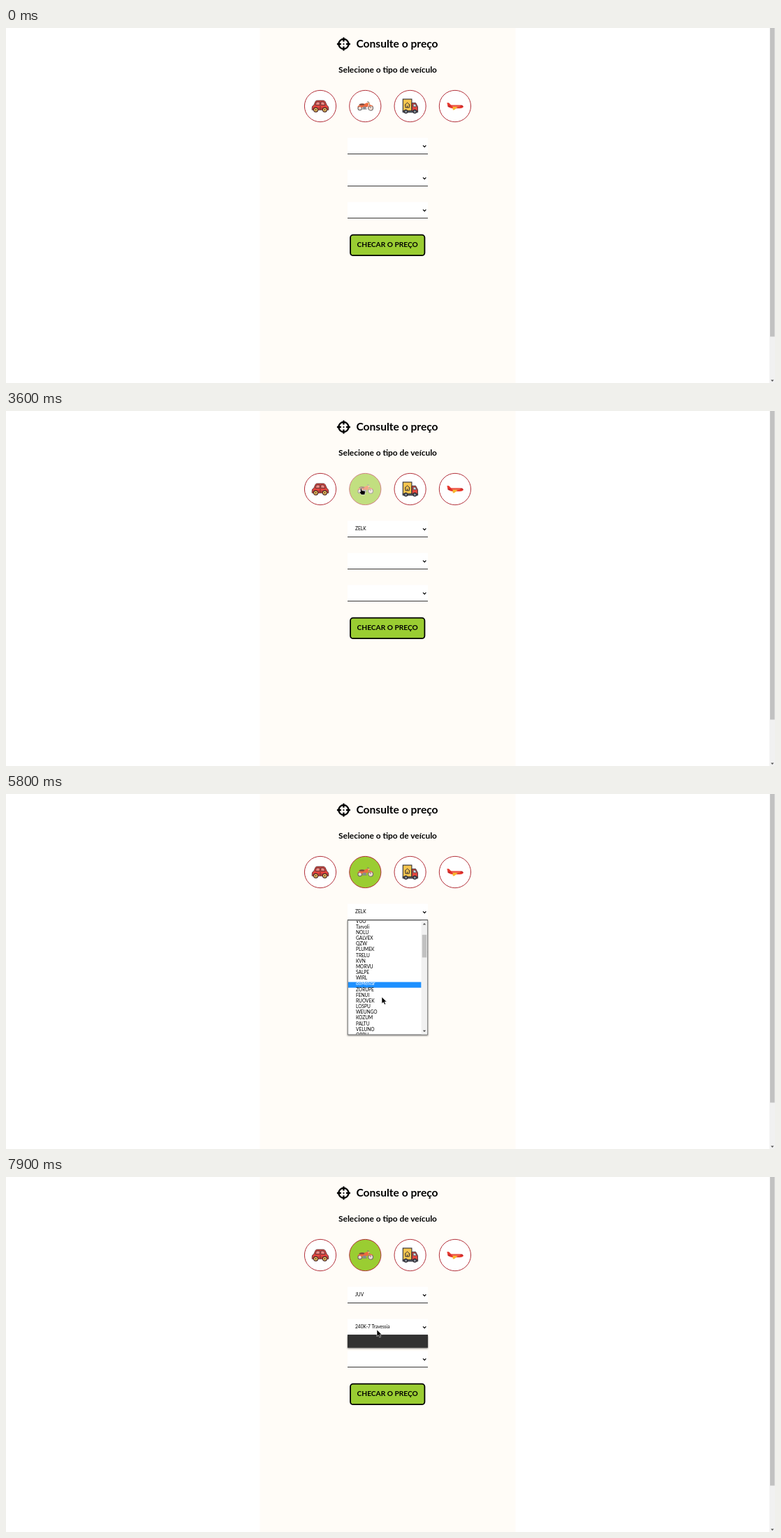
An HTML page for the animation above (8 s loop, 1101 px wide and 509 px high).

```html
<!DOCTYPE html>
<html lang="pt">
<head>
<meta charset="utf-8">
<style>
  html, body { margin: 0; width: 100%; height: 100%; overflow: hidden; background: #fff; }
  svg { display: block; width: 1101px; height: 509px; font-family: Lato, "Open Sans", sans-serif; }
  .title { font-weight: 700; text-anchor: middle; }
  .small { font-size: 6.6px; }
  .ring { stroke: #b3303a; }
</style>
</head>
<body>
<svg viewBox="0 0 1101 509">
  <defs>
    <filter id="shadow" x="-10%" y="-20%" width="120%" height="150%">
      <feDropShadow dx="0" dy="1" stdDeviation="1.3" flood-opacity=".55"/>
    </filter>
    <clipPath id="listClip"><rect x="490" y="181.5" width="113" height="163"/></clipPath>

    <g id="car" stroke="#4a2a2c" stroke-width=".8">
      <path d="M-9.5-1 L-7-6.5 Q-6.5-8-4.5-8 H4.5 Q6-8 7-6.5 L9.5-1 Q11.8 0 11.8 3 V5.5 H-11.8 V2 Q-11.8-.5-9.5-1Z" fill="#e2443e"/>
      <path d="M-7-1.5 L-5.4-6 H-.8 V-1.5Z M.8-1.5 V-6 H5 L7-1.5Z" fill="#f08a85"/>
      <path d="M-11.5 3.2 H11.5 M0-1 V5" fill="none" stroke-width=".6"/>
      <g fill="#f4c95d" stroke-width="1.2"><circle cx="-6.4" cy="5.3" r="3.1"/><circle cx="6.4" cy="5.3" r="3.1"/></g>
      <g fill="#4a2a2c" stroke="none"><circle cx="-6.4" cy="5.3" r="1"/><circle cx="6.4" cy="5.3" r="1"/></g>
    </g>

    <g id="bike">
      <g fill="#f3dfd5" stroke="#6a6668" stroke-width="1.1"><circle cx="-7.6" cy="3" r="2.8"/><circle cx="7.8" cy="2.8" r="3.4"/></g>
      <path d="M3-6.5 L5-5.5 L8 2.8 M-5 4 H2.5" fill="none" stroke="#77777b" stroke-width="1.1"/>
      <path d="M-11.5 1.8 Q-10-2-6.5-1.5 L-4.5-3.2 H-.8 Q2.5-6 5-3.8 L4 .5 L1 2 H-5.5 Q-8-1-11.5 1.8Z" fill="#ed6a40"/>
      <path d="M-9-2.5 Q-5-4.5-.8-3 L-2-1.2 H-8Z" fill="#7b4a3e"/>
      <path d="M-3.5.8 H1.6 L.6 4.6 H-3Z" fill="#8a8a90"/>
      <path d="M5-1 Q9-3.2 11.5 1 Q8-.8 5 1Z" fill="#f2754c"/>
      <circle cx="5.2" cy="-4" r="1.3" fill="#f2b06b"/>
    </g>

    <g id="truck" stroke="#2b2b33">
      <path d="M-10.5 6.5 H11 V9 H-10.5Z" fill="#5c6470" stroke-width=".8"/>
      <rect x="-10.3" y="-10" width="12.6" height="16.8" fill="#f7c64f" stroke-width="1.1"/>
      <path d="M-7.8-1.4 L-4-5 L-.2-1.4 M-6.7-2 V2 H-1.3 V-2 M-4 2 V-.6" fill="none"/>
      <path d="M2.6-4.6 H8 L10.8.8 V7 H2.6Z" fill="#e5483f" stroke-width=".9"/>
      <path d="M4.6-2.8 H7.4 L9.2.8 H4.6Z" fill="#c9e6f2" stroke-width=".6"/>
      <g fill="#8d949c" stroke-width="1.3"><circle cx="-6" cy="7.8" r="2.3"/><circle cx="6.7" cy="7.8" r="2.3"/></g>
    </g>

    <g id="plane">
      <path d="M-11.6-4.8 H-8.8 L-5.6-1.6 H6 Q11-1.8 12 .4 Q11.5 3 7 3.2 H-4 Q-9 2.6-10.5-.8Z" fill="#e8392f"/>
      <path d="M-11-.6 H-5.5 L-7.5 1.2 H-9.8Z M8.2-1.5 Q11-1.2 11.8.4 H8.4Z" fill="#b9222a"/>
      <path d="M-3.2 1 H4 L-1 5.4 H-3.2Z" fill="#f7b52e"/>
      <path d="M-3.6.2 H7" stroke="#ffd9a0" stroke-width=".8" stroke-dasharray="1 .8"/>
    </g>

    <path id="arrow" d="M0 0 V9.6 L2.3 7.6 L3.9 11 L5.6 10.2 L4.1 6.9 H7.1Z" fill="#000" stroke="#fff" stroke-width=".6"/>
    <path id="hand" d="M-.2 0 Q1.3-.5 1.6 1 L2 3.4 L5.8 4 Q7 4.3 6.8 5.6 L6.2 9.6 H1.2 L-1.4 6.2 Q-1.3 5 0 5.4Z" fill="#000" stroke="#fff" stroke-width=".6"/>
  </defs>

  <rect width="1101" height="509" fill="#fff"/>
  <rect x="363.5" width="366" height="509" fill="#fffcf7"/>
  <rect x="1093" width="8" height="509" fill="#f1f1f1"/>
  <rect x="1094" width="6.5" height="442.5" fill="#c1c1c1"/>
  <path d="M1095 504.5 h4.4 l-2.2 2.4z" fill="#505050"/>

  <g transform="translate(483.4 23)" fill="none" stroke="#000">
    <circle r="7.1" stroke-width="2.3"/>
    <path d="M0-9.5 V-3.6 M0 9.5 V3.6 M-9.5 0 H-3.6 M9.5 0 H3.6" stroke-width="2.4"/>
    <circle r="1.1" fill="#000" stroke="none"/>
  </g>
  <text class="title" x="560" y="28" font-size="15.6">Consulte o preço</text>
  <text class="title" x="546.5" y="63.6" font-size="11.9">Selecione o tipo de veículo</text>

  <g id="vehicles"></g>
  <g id="selects"></g>
  <g id="button">
    <rect x="493" y="296.6" width="106.4" height="29.6" rx="4" fill="#9acd32" stroke="#000" stroke-width="1.8"/>
    <text class="title" x="546.2" y="314.3" font-size="10.2">CHECAR O PREÇO</text>
  </g>
  <rect id="focus" x="488.6" y="157.6" width="115.6" height="23.6" rx="1" fill="none" stroke="#222"/>

  <g id="popup">
    <rect x="489.3" y="181" width="114.4" height="164" fill="#fff" stroke="#6d6d6d" stroke-width=".9" filter="url(#shadow)"/>
    <g clip-path="url(#listClip)">
      <rect id="bar" x="490" width="104.6" height="8.16" fill="#1e90ff"/>
      <g id="rows" class="small"></g>
      <rect x="594.6" y="181" width="8.6" height="164" fill="#f1f1f1"/>
      <rect id="thumb" x="595.8" width="6.4" height="32.6" fill="#c1c1c1"/>
      <path id="up" d="M596.8 187.4 h4.4 l-2.2-2.5z"/>
      <path d="M596.8 338.8 h4.4 l-2.2 2.5z" fill="#505050"/>
    </g>
  </g>
  <rect id="blank" x="489" width="115" fill="#333" filter="url(#shadow)"/>
  <use id="cursor"/>
</svg>

<script>
const LOOP = 8000, STEP = 100;
const ROW = 8.16, LIST_TOP = 181.7;
const brands = ("ZELK,OMBRIL,QUARNEVO,TILVORA,NUVEK,RONDEPA,KIPUL,VUO,Tarvoli,NOLU,GALVEX,QZW,PLUMEK," +
  "TRELU,KVN,MORVU,SALPE,WIRL,doMelvar,ZORUPE,FENUI,RUOVEK,LOSPU,WEUNGO,KOZUM,PALTU,VELUNO,OPPU,JUV," +
  "PRELO RODACALMAS,GWL,SOLVETA,TUMBERO").split(",");

// [time, x, y]
const path = [
  [100, 481, -5], [400, 479, 58], [600, 463, 112], [800, 467, 124], [900, 483, 125],
  [1000, 507, 125], [1200, 553, 123], [1300, 573.5, 122], [1500, 624, 125], [1700, 645, 121],
  [1800, 645, 121], [2400, 507.5, 110.5], [3600, 507.5, 110.5], [4400, 530, 164], [4600, 530, 164],
  [5000, 533.5, 250.5], [5400, 538, 291], [6200, 538, 291], [6500, 526, 307],
  [6900, 526, 320], [7200, 526, 320], [7600, 531, 219]
];
const scrollKeys = [[5400, 0], [5500, 6], [5600, 20], [5800, 59], [5900, 80], [6000, 91.5]];

const $ = id => document.getElementById(id);
const set = (el, attrs) => { for (const k in attrs) el.setAttribute(k, attrs[k]); };
const show = (el, on) => set(el, { visibility: on ? "visible" : "hidden" });

function sample(keys, t) {
  if (t <= keys[0][0]) return keys[0].slice(1);
  for (let i = 1; i < keys.length; i++) {
    const [a, ...from] = keys[i - 1], [b, ...to] = keys[i];
    if (t <= b) return from.map((v, k) => v + (to[k] - v) * (t - a) / (b - a));
  }
  return keys[keys.length - 1].slice(1);
}

const circleX = i => 450 + 64.3 * i;
$("vehicles").innerHTML = ["car", "bike", "truck", "plane"].map((name, i) =>
  `<g transform="translate(${circleX(i)} 112)"><circle class="ring" r="22.6" fill="#fff"/><use href="#${name}"/></g>`).join("");
$("selects").innerHTML = [0, 46, 92].map(dy =>
  `<g transform="translate(0 ${dy})"><rect x="489" y="157.5" width="115" height="23" fill="#fff"/>
   <path d="M489 180.6 H604" stroke="#333"/>
   <path d="M597 168.4 l2.2 2.2 l2.2-2.2" fill="none" stroke="#000" stroke-width="1.3"/>
   <text class="small" x="500" y="171"></text></g>`).join("");
$("rows").innerHTML = brands.map((name, i) =>
  `<text x="501" y="${LIST_TOP + i * ROW + 4.8}">${name}</text>`).join("");

const vehicles = [...$("vehicles").children];
const labels = [...$("selects").querySelectorAll("text")];
const rows = [...$("rows").children];

function drawList(t, y) {
  const [scroll] = sample(scrollKeys, t);
  // The highlight only follows the pointer while it moves.
  const hoverScroll = t < 6300 ? Math.min(scroll, 40) : scroll;
  const active = Math.max(0, Math.floor((y - LIST_TOP + hoverScroll) / ROW));
  set($("rows"), { transform: `translate(0 ${-scroll})` });
  set($("bar"), { y: LIST_TOP + active * ROW - scroll });
  set($("thumb"), { y: 190 + scroll * 0.2 });
  set($("up"), { fill: scroll ? "#505050" : "#a3a3a3" });
  rows.forEach((row, i) => set(row, { fill: i === active ? "#fff" : "#000" }));
}

function draw(t) {
  const [x, y] = sample(path, t);
  const visible = t >= 100;
  const open = t >= 4700 && t < 7100;
  const opening = t >= 4600 && t < 4700;

  let pointing = false;
  vehicles.forEach((g, i) => {
    const hover = visible && Math.hypot(x - circleX(i), y - 112) < 23;
    pointing = pointing || hover;
    set(g, { opacity: hover ? 0.6 : 1 });
    set(g.firstChild, { fill: i === 1 && t >= 2700 ? "#9acd32" : "#fff" });
  });

  const onButton = t >= 7100 && y > 296 && y < 327;
  set($("button"), { opacity: onButton ? 0.6 : 1 });

  labels[0].textContent = t < 3600 ? "" : t < 7100 ? brands[0] : brands[28];
  labels[1].textContent = t < 7500 ? "" : "240K-7 Travessia";
  show($("focus"), t >= 7100 && t < 7900);

  show($("popup"), open);
  drawList(t, y);
  show($("blank"), opening || t >= 7900);
  set($("blank"), opening ? { y: 181, height: 164 } : { y: 226.5, height: 18.3 });

  show($("cursor"), visible);
  set($("cursor"), { href: pointing || onButton ? "#hand" : "#arrow", transform: `translate(${x} ${y})` });
}

const start = performance.now();
function tick() {
  const t = (performance.now() - start) % LOOP;
  draw(Math.floor(t / STEP) * STEP);
  requestAnimationFrame(tick);
}
tick();
</script>
</body>
</html>
```
